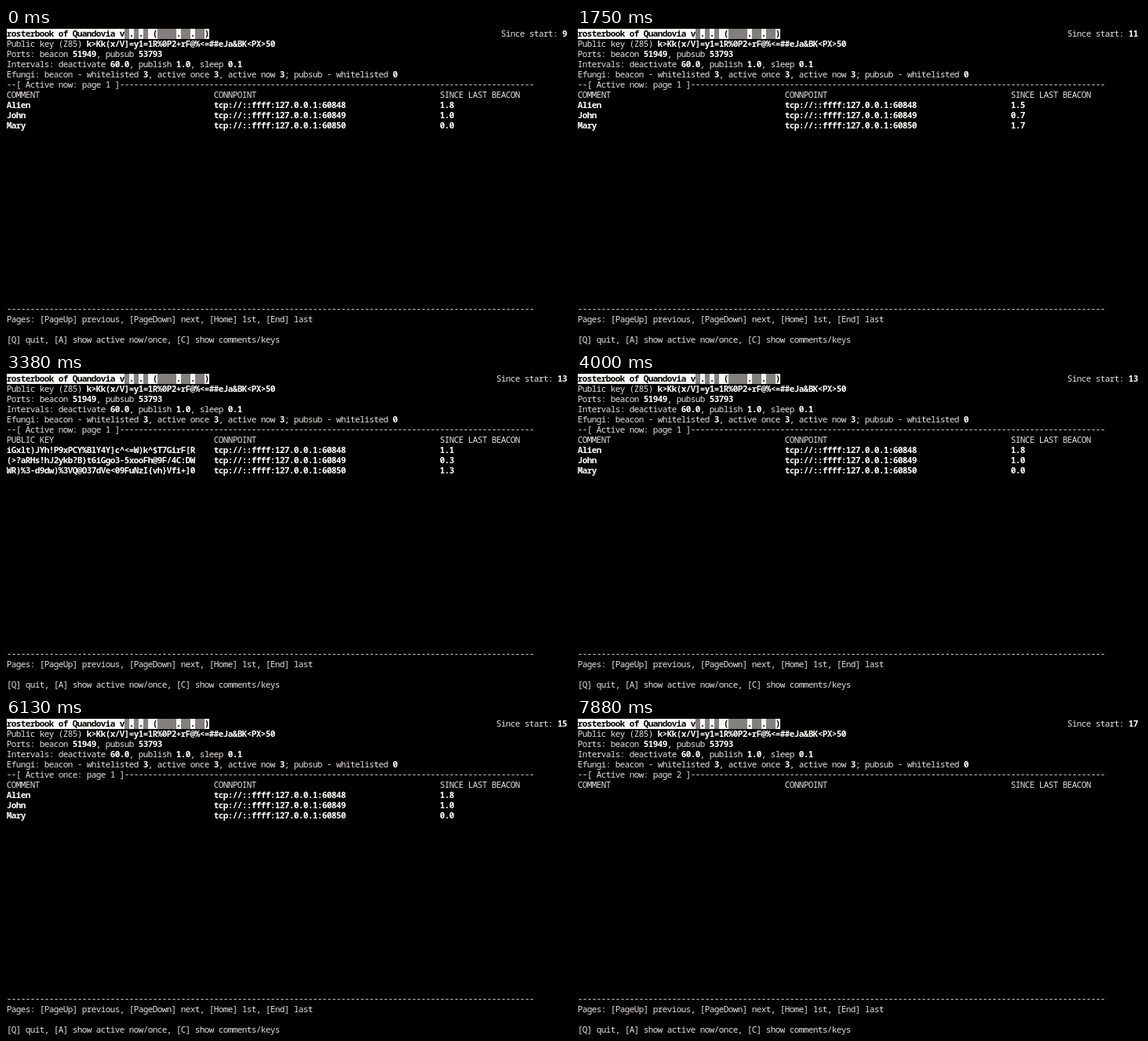
Recreate the animation shown at these times as an HTML page with a canvas. Size 720 by 404 pixels, loop 8 s.

```html
<!DOCTYPE html>
<html lang="en">
<head>
<meta charset="utf-8">
<title>Terminal monitor</title>
<style>
html, body { margin: 0; width: 100%; height: 100%; overflow: hidden; background: #000; }
canvas { display: block; }
</style>
</head>
<body>
<canvas id="screen" width="720" height="404"></canvas>
<script>
const ctx = document.getElementById('screen').getContext('2d', { alpha: false });

const CELL = 6, LINE = 13, COLS = 112, RIGHT = 119;
const LOOP = 8000, STEP = 125;
const FONT = '11px "Noto Sans Mono", "DejaVu Sans Mono", monospace';
const PLAIN = '#e4e2da', BOLD = '#fffffa';
const PAPER = '#f6f6f2', INK = '#000', GREY = '#82807c';

// '#' marks a blurred cell
const TITLE = 'rosterbook of Quandovia v#.#.# (####.##.##)';

// beacons: times in seconds at which each peer was last heard
const PEERS = [
  { name: 'Alien', key: 'iGxlt)JYh!P9xPCY%BlY4Y]c^<=W)k^$T7GirF[R', port: 60848,
    beacons: [-1.85, 0.2, 2.18, 4.28, 6.33] },
  { name: 'John', key: '(>?aRHs!hJ2ykb?B}t6iGgo3-5xooFh@9F/4C:DW', port: 60849,
    beacons: [-1.05, 1, 2.98, 5.1, 7.12] },
  { name: 'Mary', key: 'WR)%3-d9dw)%3VQ@O37dVe<09FuNzI{vh}Vfi+]0', port: 60850,
    beacons: [0.02, 2.04, 4.06, 6.08] }
];

const between = (t, a, b) => t >= a && t < b;

function put(col, row, text, color, bold) {
  ctx.font = (bold ? '600 ' : '') + FONT;
  ctx.fillStyle = color;
  [...text].forEach((ch, i) => {
    const lift = ch === '-' ? 1 : 0; // hyphens sit mid-line
    ctx.fillText(ch, 1 + (col + i) * CELL + CELL / 2, 11 + row * LINE - lift);
  });
}

// asterisks switch bold on and off
function rich(col, row, text) {
  text.split('*').forEach((part, i) => {
    const bold = i % 2 === 1;
    put(col, row, part, bold ? BOLD : PLAIN, bold);
    col += part.length;
  });
}

function drawTitle() {
  [...TITLE].forEach((ch, i) => {
    ctx.fillStyle = ch === '#' ? GREY : PAPER;
    ctx.fillRect(1 + i * CELL, 1, CELL, LINE);
  });
  put(0, 0, TITLE.replace(/#/g, ' '), INK, true);
}

function silence(peer, t) {
  const last = peer.beacons.filter(b => t >= b - 0.1).pop();
  const age = Math.max(0, t - last);
  return (Math.floor(age * 10 + 1e-6) / 10).toFixed(1);
}

function draw(t) {
  const keys = between(t, 2.25, 3.75);
  const once = between(t, 5.75, 6.5);
  const page = t >= 7.5 ? 2 : 1;

  ctx.fillStyle = '#000';
  ctx.fillRect(0, 0, 720, 404);
  ctx.textAlign = 'center';
  ctx.textBaseline = 'alphabetic';

  drawTitle();
  const secs = String(Math.floor(9.8 + t));
  const label = 'Since start: ';
  rich(RIGHT - label.length - secs.length, 0, `${label}*${secs}*`);

  rich(0, 1, 'Public key (Z85) *k>Kk(x/V]=y1=1R%0P2+rF@%<=##eJa&BK<PX>50*');
  rich(0, 2, 'Ports: beacon *51949*, pubsub *53793*');
  rich(0, 3, 'Intervals: deactivate *60.0*, publish *1.0*, sleep *0.1*');
  rich(0, 4, 'Efungi: beacon - whitelisted *3*, active once *3*, active now *3*; pubsub - whitelisted *0*');
  rich(0, 5, `--[ Active ${once ? 'once' : 'now'}: page ${page} ]`.padEnd(COLS, '-'));

  rich(0, 6, keys ? 'PUBLIC KEY' : 'COMMENT');
  rich(44, 6, 'CONNPOINT');
  rich(92, 6, 'SINCE LAST BEACON');

  if (page === 1) {
    PEERS.forEach((peer, i) => {
      put(0, 7 + i, keys ? peer.key : peer.name, BOLD, true);
      put(44, 7 + i, `tcp://::ffff:127.0.0.1:${peer.port}`, BOLD, true);
      put(92, 7 + i, silence(peer, t), BOLD, true);
    });
  }

  rich(0, 27, '-'.repeat(COLS));
  rich(0, 28, 'Pages: [PageUp] previous, [PageDown] next, [Home] 1st, [End] last');
  rich(0, 30, '[Q] quit, [A] show active now/once, [C] show comments/keys');
}

const start = performance.now();
let shown = -1;

function tick() {
  const ms = Math.max(0, performance.now() - start) % LOOP;
  const step = Math.floor(ms / STEP);
  if (step !== shown) {
    shown = step;
    draw(step * STEP / 1000);
  }
  requestAnimationFrame(tick);
}

tick();
</script>
</body>
</html>
```
